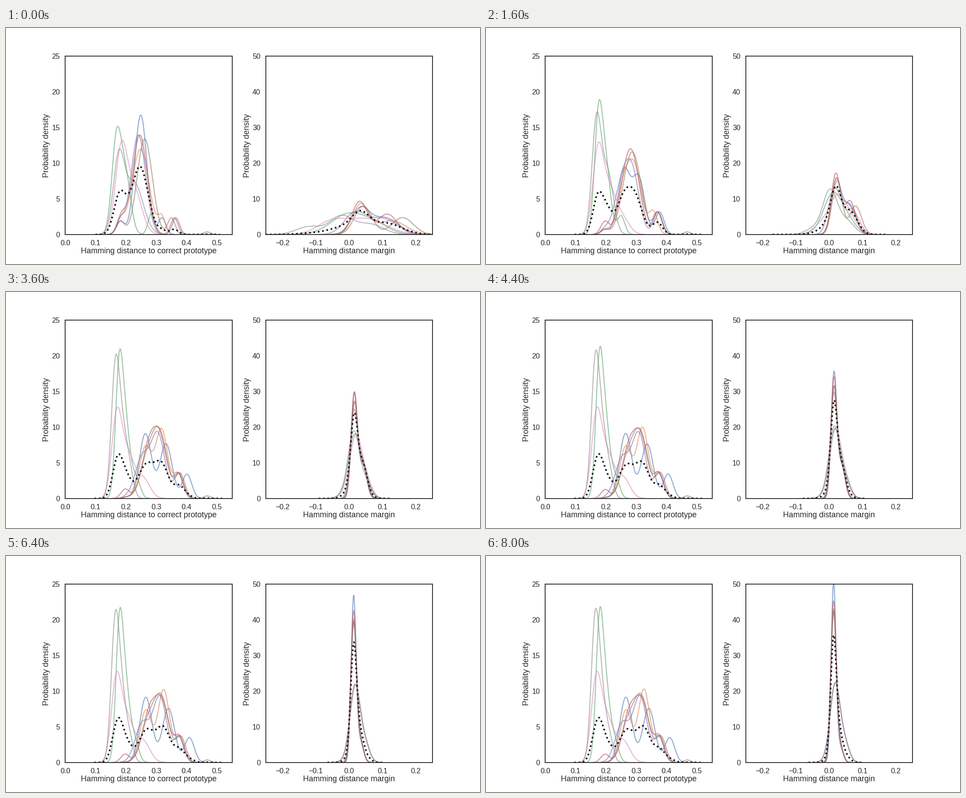
Recreate the animation shown at these times as a matplotlib script. Size 1058 px wide and 529 px high, loop 8.2 s.

```python
import numpy as np
import matplotlib.pyplot as plt
from matplotlib.animation import FuncAnimation

W, H, DPI = 1058, 529, 105.8
FRAMES, STEP_MS = 41, 200
SETTLE = 8  # frames in which the curves cover most of their way
INK = "0.15"
BLUE, ORANGE, GREEN, RED = "#4C72B0", "#DD8452", "#55A868", "#C44E52"
PURPLE, BROWN, PINK, GRAY = "#8172B3", "#937860", "#DA8BC3", "#8C8C8C"

plt.rcParams["font.family"] = "Liberation Sans"
fig = plt.figure(figsize=(W / DPI, H / DPI), dpi=DPI, facecolor="white")
fig.subplots_adjust(left=0.125, right=0.9, bottom=0.125, top=0.88, wspace=0.202)


def settle(i):
    return 1 - np.exp(-i / SETTLE)


def smooth(i):
    u = i / (FRAMES - 1)
    return u * u * (3 - 2 * u)


def density(x, bells, blur=0):
    """Sum of normal bells (centre, spread, weight), x in thousandths."""
    total = np.zeros_like(x)
    for c, s, w in bells:
        s = np.hypot(s, blur)
        total += 399 * w / s * np.exp(-0.5 * ((x - c) / s) ** 2)
    return total


class Panel:
    """One plot: coloured class curves and the dotted mean of them all."""

    def __init__(self, col, xlim, xticks, ymax, ystep, label, span, blur):
        self.ax = ax = fig.add_subplot(1, 2, col)
        self.span, self.blur, self.curves = np.array(span, float), blur, []
        ax.set(xlim=xlim, ylim=(0, ymax), xticks=xticks,
               yticks=range(0, ymax + 1, ystep))
        ax.xaxis.set_major_formatter(
            lambda v, _: f"{v:.1f}".replace("-", "\u2212"))
        ax.tick_params(length=0, pad=8, labelsize=11, labelcolor=INK)
        for spine in ax.spines.values():
            spine.set(color=INK, linewidth=1.25)
        box = ax.get_position()
        style = dict(fontsize=12, color=INK, ha="center", va="baseline",
                     rotation_mode="anchor")
        fig.text((box.x0 + box.x1) / 2, 1 - 504.6 / H, label, **style)
        fig.text(box.x0 - 37 / W, (box.y0 + box.y1) / 2,
                 "Probability density", rotation=90, **style)
        self.mean, = ax.plot([], [], color="0.08", lw=2.5, ls=":", zorder=2.2)

    def add(self, color, start, end, weight_ease=settle):
        line, = self.ax.plot([], [], color=color, lw=1.5, alpha=0.6)
        self.curves.append((line, np.array(start, float),
                            np.array(end, float), weight_ease))

    def draw(self, i):
        x = np.arange(-300, 600, 0.5)
        mean = np.zeros_like(x)
        for line, start, end, weight_ease in self.curves:
            ease = np.array([settle(i), settle(i), weight_ease(i)])
            bells = start + (end - start) * ease
            y = density(x, bells)
            mean += density(x, bells, self.blur) / len(self.curves)
            seen = y > 0.01
            line.set_data(x[seen] / 1000, y[seen])
        lo, hi = self.span[0] + (self.span[1] - self.span[0]) * settle(i)
        seen = (x >= max(lo, -260)) & (x <= hi)
        self.mean.set_data(x[seen] / 1000, mean[seen])


left = Panel(1, (0, 0.55), np.arange(6) / 10, 25, 5,
             "Hamming distance to correct prototype",
             span=[(100, 510), (95, 518)], blur=5)
right = Panel(2, (-0.25, 0.25), np.arange(-2, 3) / 10, 50, 10,
              "Hamming distance margin",
              span=[(-360, 300), (-60, 100)], blur=1)


def split(color, c, s, low, high, share, s_end, tail, tail_end, still=None):
    """A single hump that parts into two, with a tail moving outwards."""
    start = [(c, s, 0.42), (c, s, 0.42), (tail, 12, 0.07), (182, 13, 0.06)]
    end = [(low, s_end, share), (high, s_end, 0.84 - share),
           (tail_end, 16, 0.14), (205, 13, 0)]
    extra = [still] if still else []
    left.add(color, start + extra, end + extra)


def sharpen(color, main, bump, s_end):
    """Two humps that close up into one narrow peak."""
    right.add(color, [main, bump], [(13, s_end, 0.9), (32, 9, 0.1)], smooth)


def gather(color, *start):
    """Broad humps that draw together into a lower peak."""
    right.add(color, start, [(-5, 15, 0.03), (18, 14.5, 0.8), (47, 13.5, 0.17)])


split(BLUE, 249, 20, 266, 342, 0.46, 20, 319, 411)
split(ORANGE, 248, 28, 266, 326, 0.35, 19, 318, 378)
left.add(GREEN, [(169, 15.5, 0.51), (199, 17, 0.34), (284, 11, 0.08)],
         [(178, 11.5, 0.45), (197, 16, 0.45), (230, 13, 0.08)])
split(RED, 246, 24, 277, 321, 0.38, 23, 360, 376, still=(197, 14, 0.04))
split(PURPLE, 241, 24, 254, 313, 0.31, 23, 365, 375)
split(BROWN, 262, 25, 273, 319, 0.32, 24, 350, 382, still=(468, 11, 0.01))
left.add(PINK, [(184, 19, 0.53), (225, 26, 0.42), (258, 22, 0)],
         [(167, 16, 0.4), (200, 24, 0.39), (258, 22, 0.16)])
left.add(GRAY, [(176, 18, 0.45), (226, 30, 0.55), (226, 20, 0)],
         [(164, 13, 0.61), (186, 14, 0.31), (213, 12, 0.09)])

sharpen(BLUE, (33, 27, 0.47), (107, 40, 0.47), 7)
sharpen(ORANGE, (34, 24, 0.5), (126, 43, 0.42), 8.5)
gather(GREEN, (-20, 52, 0.3), (4, 46, 0.4), (78, 42, 0.28))
sharpen(RED, (31, 23, 0.53), (114, 30, 0.43), 7.9)
sharpen(PURPLE, (16, 32, 0.46), (100, 44, 0.49), 8.4)
sharpen(BROWN, (42, 26, 0.52), (160, 32, 0.38), 8.3)
gather(PINK, (-48, 45, 0.45), (45, 44, 0.41), (108, 40, 0.14))
gather(GRAY, (-120, 38, 0.21), (-24, 34, 0.43), (62, 40, 0.29))


def draw(i):
    left.draw(i)
    right.draw(i)
    return left.ax.lines[:] + right.ax.lines[:]


anim = FuncAnimation(fig, draw, frames=FRAMES, interval=STEP_MS,
                     init_func=lambda: draw(0), repeat=True, repeat_delay=0)
plt.show()
```
